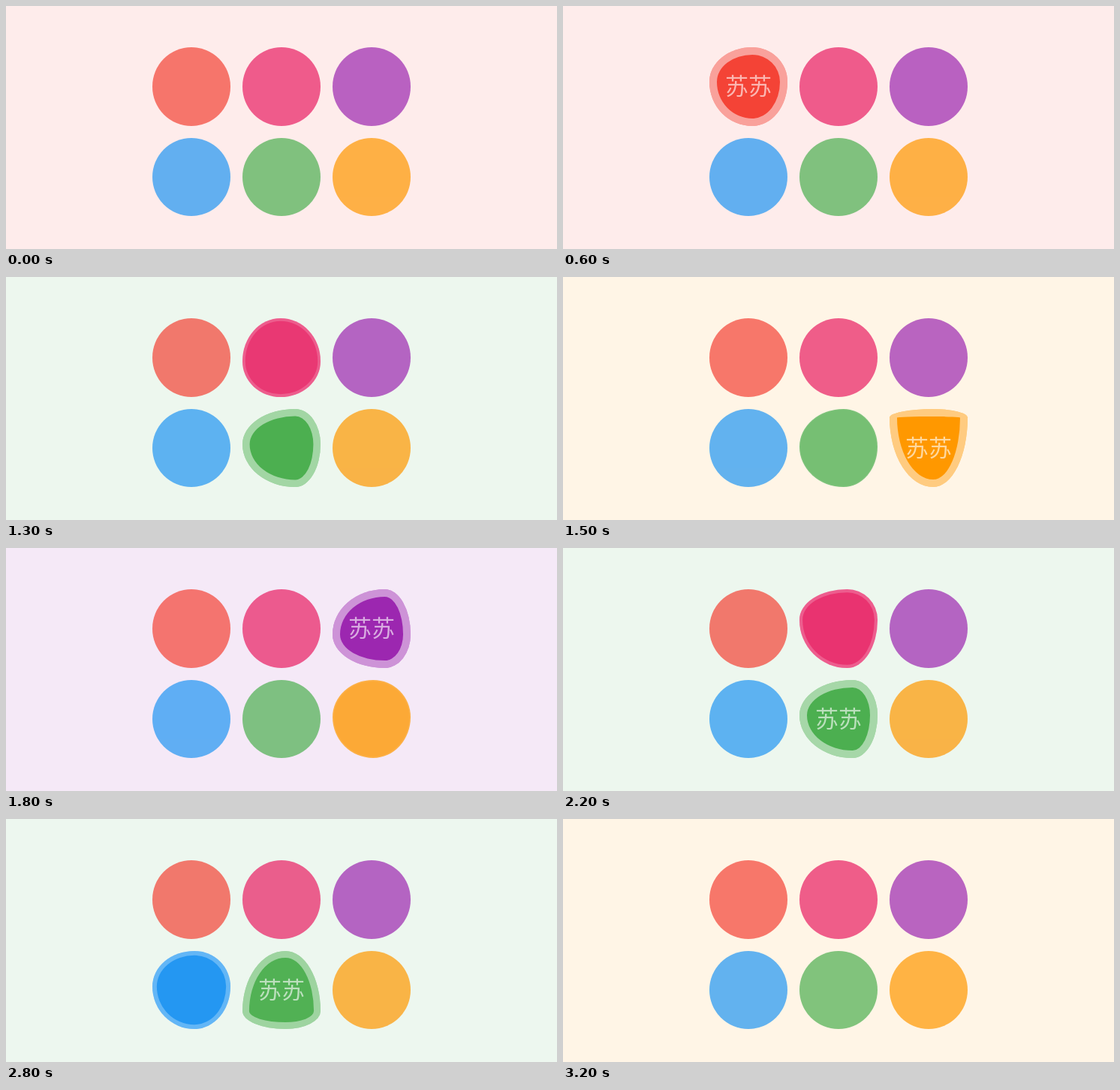
Recreate the animation shown at these times as an HTML page. Size 734x324 px, loop 3.3 s.

```html
<!DOCTYPE html>
<html lang="zh">
<head>
<meta charset="utf-8">
<style>
  html, body { margin: 0; width: 100%; height: 100%; overflow: hidden; }
  .blob {
    position: absolute; width: 104px; height: 104.3px;
    font: 300 31px/100px "Noto Sans CJK SC", "Noto Sans CJK", sans-serif;
    text-align: center; white-space: nowrap;
  }
</style>
</head>
<body>
<script>
const LOOP = 3300, STEP = 100, ENTER = 112, LEAVE = 240, OFF = -1;
const fills = [[244, 67, 54], [233, 30, 99], [156, 39, 176],
               [33, 150, 243], [76, 175, 80], [255, 152, 0]];

// Pointer route: [time, blob below the pointer from then on]
const route = [
  [130, 0], [680, 4], [910, 1], [1150, 4], [1290, OFF], [1320, 5], [1600, OFF],
  [1670, 2], [1910, 1], [2060, 4], [2220, 3], [2700, 4], [2830, 5], [2960, OFF]
];

const clamp = v => Math.max(0, Math.min(1, v));
const mix = (a, b, k) => a.map((v, i) => v + (b[i] - v) * k);
const rgb = c => `rgb(${c.map(Math.round)})`;
const tint = i => mix([255, 255, 255], fills[i], 0.1);

// Split point of the outline in %: one turn around its resting place, then still
function pose(age) {
  const turn = (age - 100) * 2.2 * Math.PI / 180;
  const swing = clamp((260 - age) / 30);
  const orbit = [55 + 13 * swing * Math.sin(turn), 44 + 33 * swing * Math.cos(turn)];
  return mix([50, 50], orbit, clamp(age / 90));
}

const blobs = fills.map((fill, i) => {
  const el = document.body.appendChild(document.createElement('div'));
  el.className = 'blob';
  el.textContent = '苏苏';
  el.style.left = 195 + i % 3 * 120 + 'px';
  el.style.top = 55.4 + Math.floor(i / 3) * 120.3 + 'px';
  el.style.background = rgb(fill);
  return el;
});

function drawBlob(el, i, t) {
  const visit = route.findLastIndex(([start, blob]) => blob === i && start <= t);
  let ring = 0, solid = 0, text = 0, shape = [50, 50];
  if (visit >= 0) {
    const start = route[visit][0], end = route[visit + 1][0];
    const age = Math.min(t, end) - start;
    const left = clamp(1 - (t - end) / LEAVE);
    const entered = clamp(age / ENTER);
    ring = entered * left;
    solid = clamp(entered * left * (t < end ? 1 : 1.6));
    text = t < end ? 0.62 : 0;
    shape = mix(shape, pose(age), Math.sqrt(left));
  }
  const [x, y] = shape, s = el.style;
  s.borderRadius = `${x}% ${100 - x}% ${100 - x}% ${x}% / ${y}% ${y}% ${100 - y}% ${100 - y}%`;
  s.boxShadow = `inset 0 0 0 ${ring * 10}px rgba(255,255,255,${ring / 2})`;
  s.opacity = 0.7 + 0.3 * solid;
  s.color = `rgba(255,255,255,${text})`;
}

function frame(now) {
  const t = Math.floor(now % LOOP / STEP) * STEP;
  let back = tint(0);
  for (const [start, blob] of route)
    if (blob !== OFF) back = mix(back, tint(blob), clamp((t - start) / ENTER));
  document.body.style.background = rgb(back);
  blobs.forEach((el, i) => drawBlob(el, i, t));
}

const begin = performance.now();
(function tick() {
  frame(performance.now() - begin);
  requestAnimationFrame(tick);
})();
</script>
</body>
</html>
```
